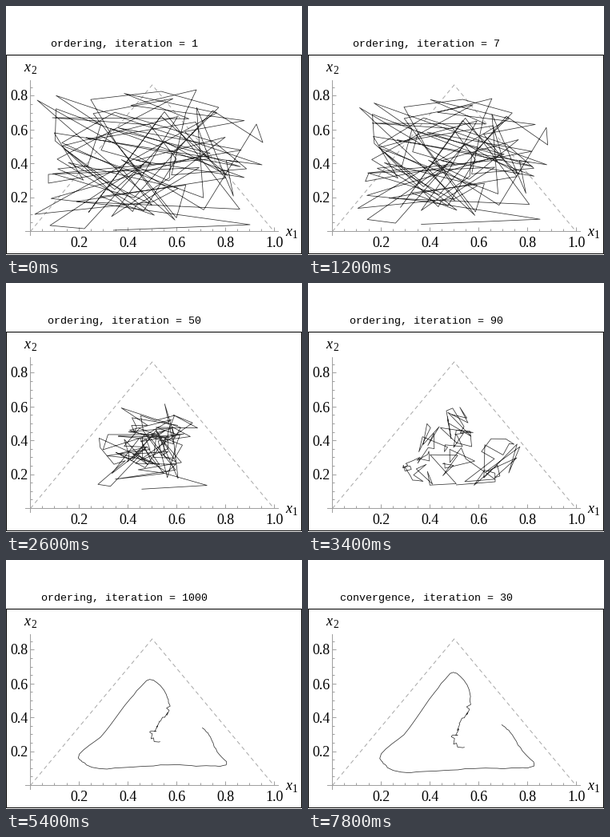
A matplotlib script that plays this animation: 370 px wide and 312 px high, repeating every 8 s.

```python
import numpy as np
import matplotlib.pyplot as plt
from matplotlib.animation import FuncAnimation
from matplotlib.patches import Rectangle

W, H, DPI = 370, 312, 100
PX = 72 / DPI                      # one pixel in points
X0, Y0, SX, SY = 30.5, 282.5, 304.5, 212.0
NODES = 100
GRAY = "#a0a0a0"

STEPS = ([("ordering", n) for n in [*range(1, 11), *range(20, 101, 10),
                                    *range(200, 1001, 100)]]
         + [("convergence", n) for n in [*range(1, 11), 20, 30]])

rng = np.random.default_rng(7)
u = np.linspace(0, 1, NODES)[:, None]


def jitter(size):
    return size * rng.uniform(-1, 1, (NODES, 2))


def smooth(*keys):
    """Cubic curve through key points, each span holding as many nodes."""
    p = np.array(keys, float)
    s = np.r_[0, np.cumsum(np.hypot(*np.diff(p, axis=0).T))]
    slope = np.gradient(p, s, axis=0)
    at = u * (len(p) - 1)
    k = np.minimum(at[:, 0].astype(int), len(p) - 2)
    t, d = at - k[:, None], (s[k + 1] - s[k])[:, None]
    return (p[k] * (1 + 2 * t) * (1 - t) ** 2 + p[k + 1] * t * t * (3 - 2 * t)
            + d * t * (1 - t) * (slope[k] * (1 - t) - slope[k + 1] * t))


# Random chain with its first edge and the outermost corners fixed
tangle = rng.uniform((55, 109), (306, 270), (NODES, 2))
tangle[:2] = (134, 281), (305, 274)
tangle[8::12] = [(39, 118), (36, 261), (238, 105), (98, 279),
                 (313, 148), (53, 222), (194, 107), (320, 199)]
tangle[[45, 57]] = (55, 275), (321, 171)
tangle[69] = 53, 211
pull = rng.uniform(0.9, 1.4, (NODES, 1))
pull[:2] = 1

# Noise is low on the left part of the crowd, high elsewhere
calm = np.exp(-((u - 0.52) / 0.13) ** 2)
crowd = smooth((215, 246), (240, 225), (240, 218), (215, 225), (180, 225),
               (160, 236), (125, 238), (124, 224), (152, 214), (146, 196),
               (178, 196), (188, 190), (182, 170), (180, 180))
crowd += jitter(25 - 19 * calm)
crowd[:2] = (185, 253), (234, 249)

loop = smooth((280, 249), (262, 250), (222, 256), (196, 240), (178, 225),
              (153, 207), (125, 211), (107, 227), (95, 250), (108, 263),
              (145, 252), (180, 227), (222, 206), (231, 194), (204, 169),
              (184, 156), (160, 153))
loop += jitter(0.7 + 1.3 * (u > 0.72))

final = smooth((242, 206), (252, 215), (267, 238), (283, 257), (255, 261),
               (215, 261), (160, 264), (100, 260), (91, 251), (122, 216),
               (160, 164), (182, 141), (203, 168), (200, 185), (194, 200),
               (188, 214), (182, 224), (195, 237))
final += jitter(0.5 + 2.5 * (u > 0.74))


def blend(a, b, t):
    return a + (b - a) * t


def shrunk(n):
    scale = np.array([np.interp(n, [1, 7, 20], [1, 0.87, 0.73]),
                      np.interp(n, [1, 7, 20], [1, 0.91, 0.81])])
    return blend((190, 198), tangle, scale ** pull)


def ease_out(t, power):
    return 1 - (1 - t) ** power


def chain(i):
    if i <= 10:
        return shrunk(STEPS[i][1])
    if i <= 17:
        return blend(shrunk(20), crowd, ease_out((i - 10) / 7, 1.5))
    if i <= 22:
        return blend(crowd, loop, ease_out((STEPS[i][1] - 90) / 410, 2.2))
    return blend(loop, final, ease_out(min((i - 22) / 8, 1), 2.5))


fig = plt.figure(figsize=(W / DPI, H / DPI), dpi=DPI, facecolor="white")
ax = fig.add_axes([0, 0, 1, 1])
ax.set(xlim=(0, W), ylim=(H, 0))
ax.axis("off")


def line(xs, ys, **kw):
    style = dict(color=GRAY, lw=PX, solid_capstyle="butt", snap=False) | kw
    return ax.plot(xs, ys, **style)[0]


def serif(x, y, s, size=18, **kw):
    ax.text(x, y, s, family="Liberation Serif", fontsize=size * PX, **kw)


def axis_name(x, y, digit):
    serif(x, y, "x", style="italic")
    serif(x + 9, y + 3, digit, 13.5)


ax.add_patch(Rectangle((0.5, 61.5), 369, 249, fill=False, ec="black", lw=PX,
                       snap=False))
line([X0, X0 + SX / 2, X0 + SX], [Y0, Y0 - 0.866 * SY, Y0],
     dashes=(5, 4), color="#a8a8a8")
line([24, 341], [Y0, Y0])
line([X0, X0], [93, 288])
for k in range(1, 21):
    major = k % 4 == 0
    size = 5 if major else 3
    x = np.floor(X0 + k / 20 * SX) + 0.5
    y = np.floor(Y0 - k / 20 * SY) + 0.5
    line([x, x], [Y0, Y0 - size])
    if major:
        serif(x, 302, f"{k / 20:.1f}", ha="center")
    if k <= 17:
        line([X0, X0 + size], [y, y])
        if major:
            serif(28, y + 6, f"{k / 20:.1f}", ha="right")
axis_name(349, 288, "1")
axis_name(22, 82, "2")

title = ax.text(0, 51.5, "", family="Liberation Mono", fontsize=13.33 * PX)
net = line([], [], color="#303030", lw=0.75 * PX, zorder=3)


def draw(i):
    phase, n = STEPS[i]
    label = f"{phase}, iteration = {n}"
    title.set_text(label)
    title.set_x(148 - 4 * len(label))
    net.set_data(*chain(i).T)
    return net, title


anim = FuncAnimation(fig, draw, frames=len(STEPS), interval=200,
                     repeat=True, repeat_delay=0)
plt.show()
```
